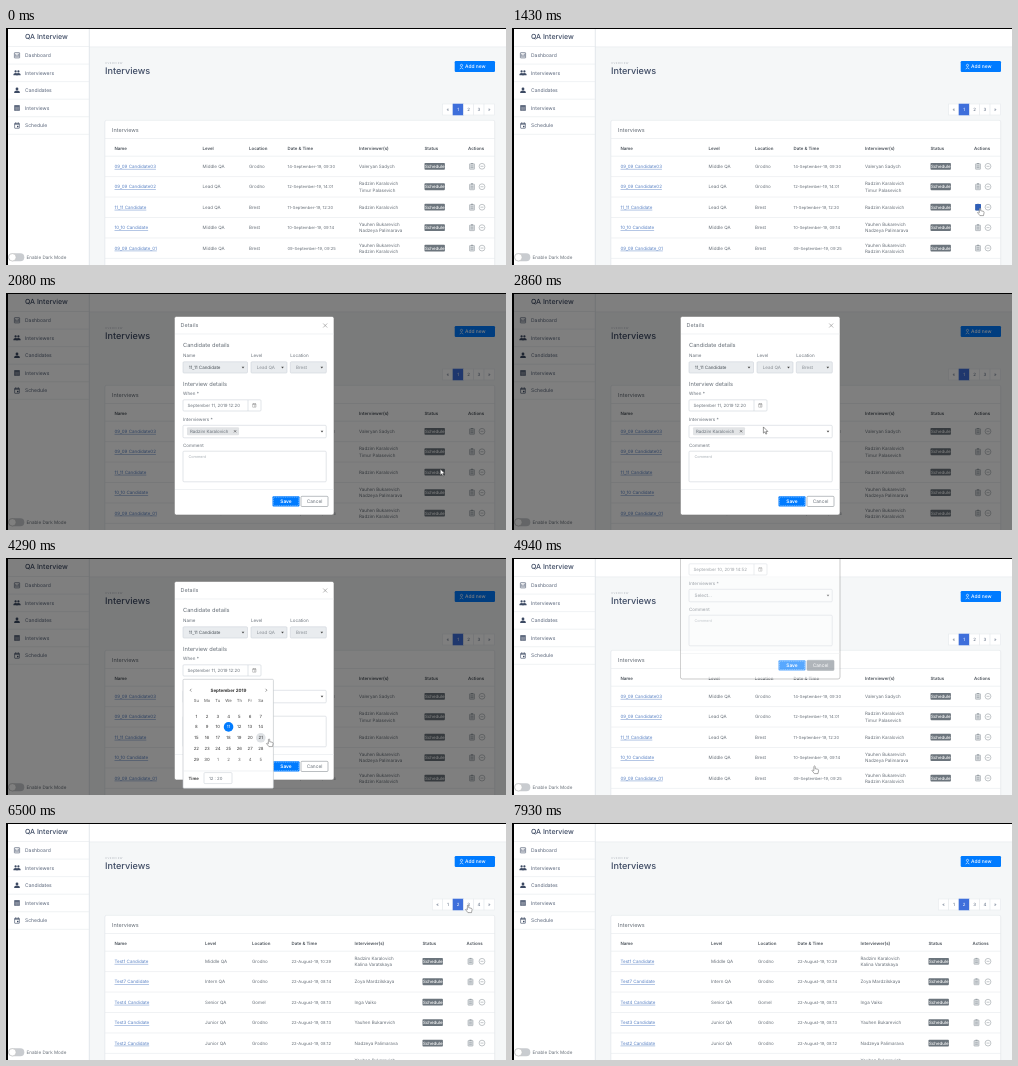
An HTML page for the animation above (8.58 s loop, 500 by 237 pixels).

```html
<!DOCTYPE html>
<html lang="en">
<head>
<meta charset="utf-8">
<title>QA Interview</title>
<style>
html, body { margin: 0; width: 100%; height: 100%; overflow: hidden; background: #f5f7f8; }
svg { display: block; width: 100vw; height: 100vh; font-family: Inter, "Open Sans", sans-serif; text-rendering: geometricPrecision; }
.link { text-decoration: underline; text-decoration-thickness: .4px; }
</style>
</head>
<body>
<script>
const LOOP = 8580, STEP = 130;
const INK = '#687079', NAVY = '#3d4a63', BLUE = '#007bff', LINE = '#e6eaed';

// Drawing helpers; text is centred vertically on y
const text = (x, y, s, size = 4.5, fill = INK, more = '') =>
  `<text x="${x}" y="${y + size * .36}" font-size="${size}" fill="${fill}" ${more}>${s}</text>`;
const mid = (x, y, s, size, fill, more = '') => text(x, y, s, size, fill, 'text-anchor="middle" ' + more);
const rect = (x, y, w, h, fill, stroke = 'none', r = 0, more = '') =>
  `<rect x="${x}" y="${y}" width="${w}" height="${h}" rx="${r}" fill="${fill}" stroke="${stroke}" stroke-width=".6" ${more}/>`;
const path = (d, stroke, w = .6, fill = 'none') =>
  `<path d="${d}" stroke="${stroke}" stroke-width="${w}" fill="${fill}"/>`;
const dot = (x, y, r, fill, stroke = 'none') =>
  `<circle cx="${x}" cy="${y}" r="${r}" fill="${fill}" stroke="${stroke}" stroke-width=".6"/>`;
const hline = (x, y, w) => path(`M${x} ${y}h${w}`, LINE);
const group = (id, body) => `<g id="${id}">${body}</g>`;
const bold = 'font-weight="600"', medium = 'font-weight="500"';
const arrow = (x, y) => path(`M${x - 1.3} ${y - .8}h2.6l-1.3 1.8z`, 'none', 0, '#444');

const person = (x, y, r = 1.4) => dot(x, y - 1.4, r, NAVY) +
  path(`M${x - 2 * r} ${y + 2.5}v-.9q0-1.5 ${2 * r}-1.5t${2 * r} 1.5v.9z`, 'none', 0, NAVY);
const calendarIcon = (x, y, c, k = 1) => `<g transform="translate(${x} ${y}) scale(${k})">` +
  rect(-2.4, -2.2, 4.8, 5, 'none', c, .4) + path('M-2.4-1.4h4.8M-1.3-3v1M1.3-3v1', c, .9) + rect(0, .3, 1.5, 1.5, c) + '</g>';

const icons = [
  y => rect(8.4, y - 2.6, 5.2, 5.2, 'none', NAVY, .4) + path(`M9.8 ${y + 1.5}v-2.6M11 ${y + 1.5}v-1.4M12.2 ${y + 1.5}v-3`, NAVY, .7),
  y => person(9.6, y, 1.1) + person(12.4, y, 1.1),
  y => person(11, y),
  y => rect(8.2, y - 2.8, 5.6, 5.6, NAVY, 'none', .4) + path(`M8.2 ${y - .9}h5.6M8.2 ${y + 1}h5.6M10.1 ${y - .9}v3.7M12 ${y - .9}v3.7`, '#fff', .4),
  y => calendarIcon(11, y, NAVY)
];

function sidebar() {
  let s = rect(0, 0, 83, 237, '#fff') + path('M83.3 0V237', '#dfe4e8', .8) + hline(0, 18.5, 83) +
    text(19, 8.7, 'QA Interview', 7, NAVY, medium);
  ['Dashboard', 'Interviewers', 'Candidates', 'Interviews', 'Schedule'].forEach((name, i) => {
    const y = 27.3 + 17.55 * i;
    s += icons[i](y) + text(19, y, name, 5, '#5a667b') + hline(2, y + 8.8, 81);
  });
  return s + rect(2.3, 225.3, 16, 8, '#c9ccd0', 'none', 4) + dot(6.4, 229.3, 3.7, '#fff', '#bbb') +
    text(20.5, 229.3, 'Enable Dark Mode', 4.6);
}

function frame() {
  return rect(0, 0, 500, 237, '#f5f7f8') + rect(83, 0, 417, 18.7, '#fff') + hline(83, 19, 417) + sidebar() +
    text(99, 35, 'OVERVIEW', 2.7, '#b4b9c0', 'letter-spacing=".5"') +
    text(99, 42.6, 'Interviews', 9.1, NAVY, medium) +
    rect(448.7, 33, 40.3, 11, BLUE, 'none', 1.2) + dot(455.5, 37.4, 1.1, 'none', '#fff') +
    path('M453.7 41q1.8-2.6 3.6 0', '#fff') + text(459, 38.6, 'Add new', 4.9, '#fff', medium) +
    rect(98.6, 92, 390.6, 160, '#e9edf0', 'none', 2) + rect(99, 92.3, 389.6, 160, '#fff', LINE, 1.5) +
    text(106, 102, 'Interviews', 5.5, INK) + hline(99, 110.5, 390);
}

function pager(count, active) {
  const items = ['«', ...Array.from({length: count}, (_, i) => i + 1), '»'];
  const left = 488.4 - items.length * 10.35;
  return items.map((s, i) => {
    const x = left + i * 10.35, on = i === active;
    return rect(x, 76, 10.35, 11, on ? '#3f6fdb' : '#fff', on ? '#3f6fdb' : LINE) +
      mid(x + 5.2, 81.5, s, 4.4, on ? '#fff' : '#56657c');
  }).join('');
}

function table(cols, rows, editX) {
  const heads = ['Name', 'Level', 'Location', 'Date &amp; Time', 'Interviewer(s)', 'Status', 'Actions'];
  let s = heads.map((h, i) => text(cols[i], 120, h, 4.4, '#4b525a', bold)).join('') + hline(99, 128.2, 390);
  rows.forEach(([name, level, city, date, ...who], i) => {
    const y = 138.3 + 20.45 * i;
    s += text(cols[0], y, name, 4.5, '#5a82c4', 'class="link"') + text(cols[1], y, level) +
      text(cols[2], y, city) + text(cols[3], y, date, 4.15) +
      who.map((n, k) => text(cols[4], y + (k * 2 - who.length + 1) * 3.2, n)).join('') +
      rect(cols[5], y - 3.4, 20.4, 6.8, '#6c757d', 'none', .8) + mid(cols[5] + 10.2, y, 'Schedule', 4.4, '#fff', medium) +
      rect(editX - 2.5, y - 2.6, 5, 5.6, '#d5d9dc', '#a3a9af', .5) +
      path(`M${editX - 1} ${y - 2.8}h2`, '#9aa1a7', 1.2) +
      path(`M${editX - 1.3} ${y - .4}h2.6M${editX - 1.3} ${y + 1.2}h2.6`, '#868e96', .5) +
      dot(476, y, 2.9, 'none', '#9aa1a7') + path(`M474.5 ${y}h3`, '#9aa1a7') + hline(99, y + 10.3, 390);
  });
  return s;
}

const [max, yan, lub, nad, kal, zoya, inga, val] = ['Radzim Karalovich', 'Timur Palasevich', 'Yauhen Bukarevich',
  'Nadzeya Palimarava', 'Kalina Varatskaya', 'Zoya Mardzilskaya', 'Inga Vaiko', 'Valeryan Sadych'];
const sept = (d, time) => `${d}-September-19, ${time}`, aug = time => `22-August-19, ${time}`;

const firstPage = table([108.5, 196.5, 243, 281.5, 353, 418.5, 462], [
  ['09_09 Candidate03', 'Middle QA', 'Grodno', sept(14, '09:30'), val],
  ['09_09 Candidate02', 'Lead QA', 'Grodno', sept(12, '14:01'), max, yan],
  ['11_11 Candidate', 'Lead QA', 'Brest', sept(11, '12:20'), max],
  ['10_10 Candidate', 'Middle QA', 'Brest', sept(10, '09:14'), lub, nad],
  ['09_09 Candidate_01', 'Middle QA', 'Brest', sept('09', '09:25'), lub, max]
], 466) + pager(3, 1);

const secondPage = table([108.5, 199, 246, 285.5, 348.5, 416.5, 460.5], [
  ['Test1 Candidate', 'Middle QA', 'Grodno', aug('10:29'), max, kal],
  ['Test7 Candidate', 'Intern QA', 'Grodno', aug('08:14'), zoya],
  ['Test4 Candidate', 'Senior QA', 'Gomel', aug('08:13'), inga],
  ['Test3 Candidate', 'Junior QA', 'Grodno', aug('08:13'), lub],
  ['Test2 Candidate', 'Junior QA', 'Grodno', aug('08:12'), nad],
  ['Test1 Candidate', 'Junior QA', 'Grodno', aug('08:12'), lub, max]
], 464.5) + pager(4, 2);

function modal() {
  const field = (x, y, w, h, fill = '#fff') => rect(x, y, w, h, fill, '#ced4da', 1);
  const select = (x, w, label, value, fill) => text(x, 62.6, label) + field(x, 68.8, w, 11.2, '#e9ecef') +
    text(x + 5.7, 74.5, value, 4.5, fill) + arrow(x + w - 4.5, 74.5);
  return rect(168.4, 23.4, 159.6, 198.6, '#fff', '#777', 2) +
    text(174.5, 32.3, 'Details', 5.4, INK, 'letter-spacing=".1"') + path('M317.2 30.5l4 4m0-4l-4 4', '#888') + hline(169, 41, 158.6) +
    text(177, 52, 'Candidate details', 5.7) +
    select(177, 64.5, 'Name', '11_11 Candidate', '#495057') + select(245, 36, 'Level', 'Lead QA', '#888e94') +
    select(284.3, 36, 'Location', 'Brest', '#888e94') +
    text(177, 91, 'Interview details', 5.7) + text(177, 100.5, 'When *') +
    field(177, 106.8, 78, 11.2) + path('M242 107v11', '#ced4da') + calendarIcon(248.3, 112.3, '#888', .7) +
    text(177, 126.4, 'Interviewers *') + field(177, 132.3, 143.2, 12.5) + arrow(316, 138.5) +
    text(177, 152.5, 'Comment') + field(177, 158.2, 143.2, 30.6) + text(182.5, 163.3, 'Comment', 3.8, '#a6adb3') +
    hline(169, 196.5, 158.6) +
    rect(266.5, 203.3, 27, 10.2, BLUE, 'none', 1) +
    rect(267.4, 204.2, 25.2, 8.4, 'none', '#9fd0ff', .8, 'stroke-dasharray="1 .8"') + mid(280, 208.4, 'Save', 4.8, '#fff', bold) +
    rect(295, 203.3, 27, 10.2, '#fff', '#8b9298', 1, 'id="cancel"') + mid(308.5, 208.4, 'Cancel', 4.8, INK, 'id="cancelText"') +
    group('filled', text(181.5, 112.5, 'September 11, 2019 12:20', 4.4) + rect(181, 134.2, 52, 8, '#e2e4e6', 'none', 1) +
      text(184, 138.3, max, 4.4) + path('M228 137.2l2.2 2.2m0-2.2l-2.2 2.2', '#444')) +
    group('blank', text(181.5, 112.5, 'September 10, 2019 14:52', 4.4) + text(182.5, 138.5, 'Select...', 4.6));
}

function picker() {
  const colX = i => 190.3 + 10.75 * i;
  let s = rect(177, 121.3, 90.4, 109, '#fff', '#b9bec3', 1) + hline(177, 213, 90) +
    mid(222.5, 132, 'September 2019', 4.5, '#333', 'font-weight="700"') +
    path('M185.4 130.8l-1.3 1.4 1.3 1.4M259.6 130.8l1.3 1.4-1.3 1.4', '#555');
  ['Su', 'Mo', 'Tu', 'We', 'Th', 'Fr', 'Sa'].forEach((d, i) => s += mid(colX(i), 142.2, d, 4.2, '#555'));
  for (let i = 0; i < 35; i++) {
    const day = i % 30 + 1, x = colX(i % 7), y = 158 + 10.9 * Math.floor(i / 7);
    if (i === 10) s += dot(x, y, 4.8, BLUE);
    if (i === 20) s += group('hover', dot(x, y, 4.8, '#dfe2e5'));
    s += mid(x, y, day, 4.3, i === 10 ? '#fff' : i > 29 ? '#666' : '#333');
  }
  return s + text(182.5, 220.2, 'Time', 4.3, '#333', bold) + rect(198, 214.6, 28, 11, '#fff', '#ced4da', 1) +
    text(203, 220.2, '12 : 20', 4.3);
}

const pointer = path('M0 0v6.2l1.5-1.3 1 2.3 1-.5-1-2.2h2z', '#333', .5, '#fff');
const hand = path('M-.6-2.6q.7-1 1.3 0v2.3l2.6.6q1 .3.8 1.3l-.6 3h-3.6l-2.4-3q.3-1 1.4-.3l.5.4z', '#555', .5, '#fff');

document.body.innerHTML = `<svg viewBox="0 0 500 237" preserveAspectRatio="none">` + frame() +
  group('first', firstPage + group('edit', rect(463.2, 176, 5.8, 6.4, '#2f5fb8', 'none', .6))) +
  group('second', secondPage) +
  rect(0, 0, 500, 237, '#000', 'none', 0, 'id="shade"') +
  group('modal', modal()) + group('picker', picker()) +
  rect(0, 0, 500, 1, '#000') + rect(0, 0, 2, 237, '#000') +
  group('cursor', group('pointer', pointer) + group('hand', hand)) + '</svg>';

const el = id => document.getElementById(id);
const show = (id, on) => el(id).setAttribute('display', on ? 'inline' : 'none');

// Key points: time, then values; eased or straight in between
function track(keys, t, ease = k => k) {
  const i = keys.findIndex(k => k[0] > t);
  if (i === 0) return keys[0].slice(1);
  if (i < 0) return keys[keys.length - 1].slice(1);
  const a = keys[i - 1], b = keys[i], k = ease((t - a[0]) / (b[0] - a[0]));
  return a.slice(1).map((v, n) => v + (b[n + 1] - v) * k);
}
const smooth = k => k * k * (3 - 2 * k);

const route = [[130, 258, 238], [1300, 468, 183], [1950, 468, 183], [2470, 252, 138], [2730, 252, 138],
  [3250, 248, 112], [4160, 248, 112], [4290, 263, 184], [4680, 302.5, 211], [5070, 302.5, 211],
  [5980, 462, 85], [6760, 462, 85], [7280, 258, 236]];
const shade = [[1560, 0], [1820, .5], [4680, .5], [4940, 0]];
const slide = [[1820, -150, 0], [1950, -60, .8], [2080, 0, 1], [4680, 0, 1], [4810, -45, .9], [4940, -101, .65], [5070, -200, 0]];

function draw(now) {
  const t = Math.floor(now % LOOP / STEP) * STEP;
  const within = (a, b) => t >= a && t < b;
  const [x, y] = track(route, t, smooth);
  const [drop, alpha] = track(slide, t);

  show('first', t < 6110);
  show('second', t >= 6110);
  show('edit', within(1300, 2080));
  el('shade').setAttribute('opacity', track(shade, t)[0]);
  el('modal').setAttribute('transform', `translate(0 ${drop})`);
  el('modal').setAttribute('opacity', alpha);
  show('filled', t < 4420);
  show('blank', t >= 4420);
  el('cancel').setAttribute('fill', t >= 4680 ? '#868e96' : '#fff');
  el('cancelText').setAttribute('fill', t >= 4680 ? '#fff' : INK);
  show('picker', within(3640, 4420));
  show('hover', t >= 4290);

  const isHand = within(1300, 2080) || within(3250, 5070) || within(5850, 6890);
  show('cursor', within(260, 7930));
  show('hand', isHand);
  show('pointer', !isHand);
  el('cursor').setAttribute('transform', `translate(${x} ${y})`);
}

let start;
function tick(now) {
  start ??= now;
  draw(now - start);
  requestAnimationFrame(tick);
}
draw(0);
requestAnimationFrame(tick);
</script>
</body>
</html>
```
